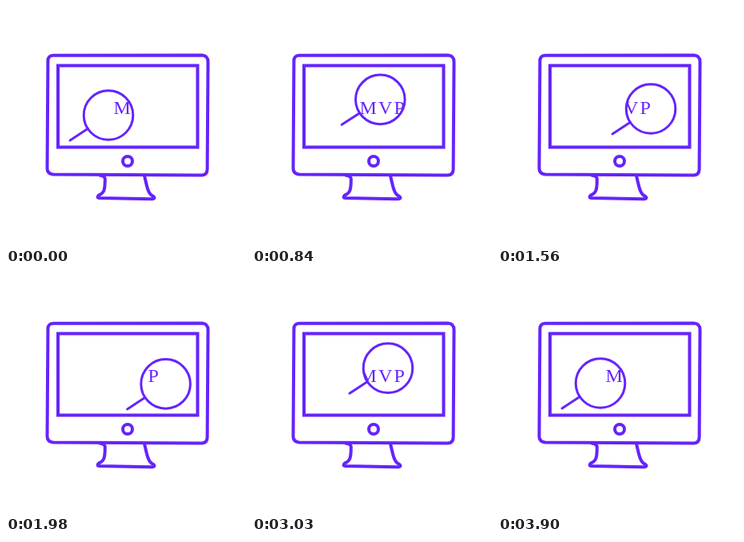
An HTML page for the animation above (4500 ms loop, 300x300 px).

```html
<!DOCTYPE html>
<html lang="en">
<head>
<meta charset="utf-8">
<title>Magnifier on a monitor</title>
<style>
  html, body { margin: 0; width: 100%; height: 100%; overflow: hidden; background: #fff; }
  svg { display: block; width: 100vw; height: 100vh; }
  .ink { fill: none; stroke: #6524fb; stroke-linecap: round; stroke-linejoin: round; }
  text { font: 24px "Liberation Serif", "Times New Roman", serif; letter-spacing: 2.2px; fill: #6524fb; }
</style>
</head>
<body>
<svg viewBox="0 0 300 300">
  <defs>
    <path id="track" d="M128 136.5C146 109.8 178 110.4 199.6 137.4"/>
    <clipPath id="view"><circle id="hole" cx="128" cy="136.5" r="31"/></clipPath>
  </defs>

  <g class="ink" stroke-width="4">
    <path d="M52.4 69.5Q52 62 59 61.8L245 61.5Q252.6 62 252.5 70L251.6 204Q251.5 211 245 211.6L59 210.6Q51.5 209.5 51.5 203Z"/>
    <path d="M65 74.5H239.5V176.5H65Z" stroke-linejoin="miter"/>
    <circle cx="152" cy="194" r="6"/>
    <path d="M117 211.5Q123.5 212.5 123.8 216C123.8 229 123 234 116 236.5Q112.5 239.5 117 240L182 241.3Q188 240.5 183.5 237.5C177.5 235 176 225 173 212"/>
  </g>

  <g clip-path="url(#view)"><text x="134.5" y="135">MVP</text></g>

  <g id="lens" class="ink" stroke-width="3" transform="translate(128 136.5)">
    <circle r="30.8"/>
    <path d="M-25.6 16.8L-48 31.5"/>
  </g>
</svg>
<script>
  const get = id => document.getElementById(id);
  const track = get("track"), lens = get("lens"), hole = get("hole");
  const LOOP = 4500, STEP = 30;
  const ARRIVE = 1825, LEAVE = 2385, HOME = 3900;
  const length = track.getTotalLength();

  // Share of the track covered: out, wait, back, wait.
  function progress(t) {
    if (t < ARRIVE) return t / ARRIVE;
    if (t < LEAVE) return 1;
    return Math.max(0, (HOME - t) / (HOME - LEAVE));
  }

  function draw() {
    const t = Math.floor(performance.now() % LOOP / STEP) * STEP;
    const { x, y } = track.getPointAtLength(progress(t) * length);
    lens.setAttribute("transform", `translate(${x} ${y})`);
    hole.setAttribute("cx", x);
    hole.setAttribute("cy", y);
    requestAnimationFrame(draw);
  }
  draw();
</script>
</body>
</html>
```
